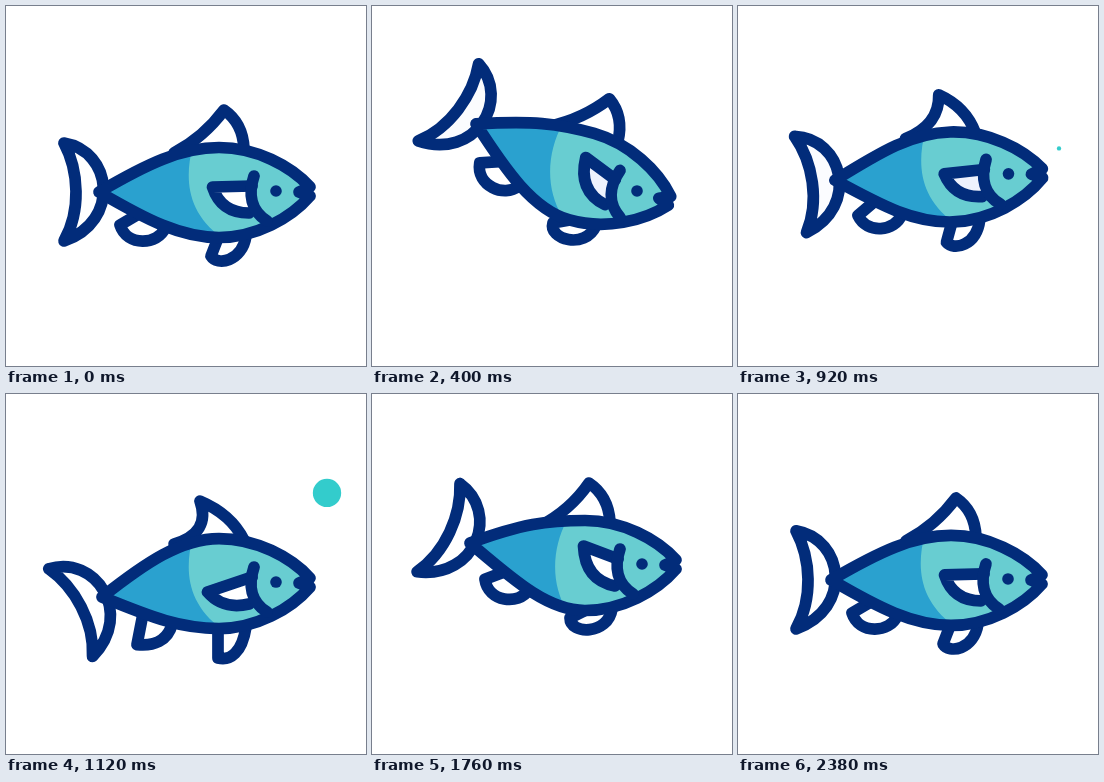
Write an HTML page with a canvas that moves like this. It is 360 by 360 pixels and loops after 2.4 s.

```html
<!DOCTYPE html>
<html>
<head>
<meta charset="utf-8">
<title>Swimming fish</title>
<style>
html, body { margin: 0; height: 100%; overflow: hidden; background: #fff; }
canvas { display: block; width: 360px; height: 360px; }
</style>
</head>
<body>
<canvas id="stage" width="360" height="360"></canvas>
<script>
const ctx = document.getElementById('stage').getContext('2d');
const LOOP = 2400, INK = '#022c7a', LIGHT = '#68cdd1', DEEP = '#2aa1cf';

// time, eye x, eye y, head angle, tail joint x, y, back angle, tail angle, tail size, fin swing, dorsal lean, tint
const poses = [
  [0, 270, 185, 0, 93, 186, 0, 0, 1, 0, 0, 0],
  [400, 265, 185, 16, 104, 118, 27, 38, 1, -1, 0, .5],
  [720, 270, 152, 0, 99, 136, 10, 21, .97, -.9, -4, 1],
  [1120, 270, 188, 0, 96, 203, -8, -26.5, 1, 1, -24, 0],
  [1480, 268, 190, 8, 99, 157, 11, 16, .91, -.28, -8, .6],
  [1760, 270, 170, 0, 98, 149, 10, 26, 1, -1, -1, 0],
  [2400, 270, 185, 0, 93, 186, 0, 0, 1, 0, 0, 0]
];

// Smooth Hermite curve through the poses, at rest at both ends
function poseAt(t) {
  const last = poses.length - 1;
  let i = 0;
  while (i < last - 1 && t >= poses[i + 1][0]) i++;
  const p = poses[i], q = poses[i + 1], span = q[0] - p[0], u = (t - p[0]) / span;
  const slope = (k, n) => k === 0 || k === last ? 0 :
    (poses[k + 1][n] - poses[k - 1][n]) / (poses[k + 1][0] - poses[k - 1][0]);
  return p.map((v, n) =>
    v + (q[n] - v) * u * u * (3 - 2 * u) +
    span * u * (1 - u) * (slope(i, n) * (1 - u) - slope(i + 1, n) * u));
}

// Maps flat lists of local coordinates to the stage
function frame(ox, oy, degrees, size = 1) {
  const a = degrees * Math.PI / 180, c = size * Math.cos(a), s = size * Math.sin(a);
  return (...v) => v.map((n, i) => i % 2 ? oy + v[i - 1] * s + n * c : ox + n * c - v[i + 1] * s);
}

function path(start, ...segments) {
  const p = new Path2D();
  p.moveTo(...start);
  for (const s of segments) {
    if (s.length === 2) p.lineTo(...s);
    else if (s.length === 4) p.quadraticCurveTo(...s);
    else p.bezierCurveTo(...s);
  }
  return p;
}

function paint(p, fill) {
  if (fill) { ctx.fillStyle = fill; ctx.fill(p); }
  ctx.stroke(p);
}

function disc(x, y, r, fill) {
  ctx.fillStyle = fill;
  ctx.beginPath();
  ctx.arc(x, y, r, 0, 2 * Math.PI);
  ctx.fill();
}

function bubble(t, start, x, y, rise, size) {
  const p = (t - start) / 400;
  if (p <= 0 || p >= 1) return;
  ctx.globalAlpha = Math.min(1, (1 - p) / .4);
  disc(x, y - rise * p, size * (1 - (1 - p) ** 2.7), '#33cccc');
  ctx.globalAlpha = 1;
}

const pale = k => `rgb(${255 - 34 * k},${255 - 26 * k},${255 - 4 * k})`;

function drawFish(t) {
  const [, ex, ey, turn, jx, jy, bend, wag, tailSize, swing, lean, rawTint] = poseAt(t);
  const head = frame(ex, ey, turn), back = frame(jx, jy, bend), tail = frame(jx, jy, wag, tailSize);
  const drop = Math.max(0, swing), lift = Math.min(0, swing);
  const tint = Math.min(1, Math.max(0, rawTint));

  // Tail, dorsal and lower fins
  paint(path(tail(-35, -49), tail(13, -41, 22, 29, -35, 49), tail(-18, 19, -20, -21, -35, -49)),
    pale(tint ** 3));
  paint(path(head(-102, -38),
    head(-72 - lean * .3, -54 - lean * .2, -52 + lean, -81),
    head(-33 + lean * .5, -68, -32, -42)), '#fff');
  paint(path(back(38, 23), back(21 + 7 * drop, 33 + 19 * drop),
    back(28 + 16 * drop, 55 + drop, 59, 53, 66, 36)), '#fff');
  paint(path(head(-58, 47), head(-65 + 7 * swing, 65 + 11 * swing),
    head(-59 + 13 * swing, 75 + 4 * swing, -34, 71, -30, 45)), '#fff');

  // Body with its darker rear part
  const body = path(back(0, 0),
    [...back(48, -28), ...head(-95, -43.5, -57, -43.5)],
    head(-20, -43.5, 15, -25, 34, -4),
    head(23, 1), head(34, 5),
    head(15, 27, -20, 46.5, -57, 46.5),
    [...head(-95, 46.5), ...back(48, 28, 0, 0)]);
  body.closePath();
  ctx.fillStyle = LIGHT;
  ctx.fill(body);
  ctx.save();
  ctx.clip(body);
  ctx.fillStyle = DEEP;
  const band = frame(ex, head(-80, 0)[1], 0);
  ctx.fill(path(band(-83 - 9 * lift, -46),
    band(-91, -15, -91, 20, -54 + 21 * lift, 47),
    band(-54 + 21 * lift, 150), band(-300, 150), band(-300, -150), band(-83 - 9 * lift, -150)));
  ctx.restore();
  paint(body);

  // Side fin, gill and eye
  paint(path(head(-24, -5), head(-63.5 - 5 * swing, -4 + 14 * swing),
    head(-55 + 2 * swing, 22 + 6 * swing, -27, 22)), pale(tint));
  paint(path(head(-22, -15), head(-28, 3, -25, 20, -9, 30)));
  disc(ex, ey, 5.8, INK);
}

function render(now) {
  const t = now % LOOP;
  ctx.fillStyle = '#fff';
  ctx.fillRect(0, 0, 360, 360);
  ctx.strokeStyle = INK;
  ctx.lineWidth = 11.7;
  ctx.lineCap = ctx.lineJoin = 'round';
  drawFish(t);
  bubble(t, 440, 44, 339, 73, 24);
  bubble(t, 900, 321, 147, 87, 16);
}

const begin = performance.now();
function tick() {
  render(performance.now() - begin);
  requestAnimationFrame(tick);
}
tick();
</script>
</body>
</html>
```
